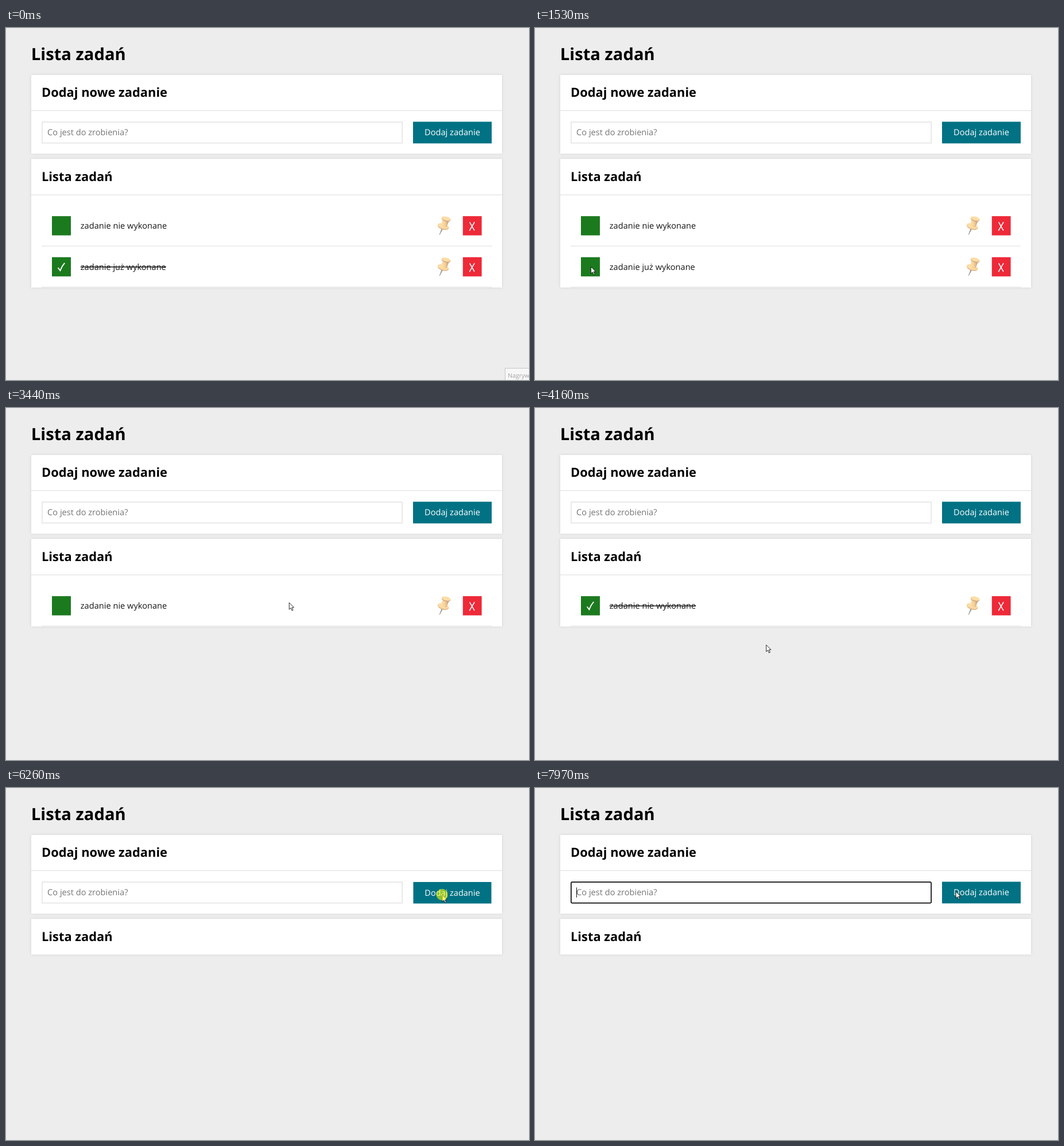
An HTML page for the animation above (8000 ms loop, 911 by 614 pixels).

```html
<!DOCTYPE html>
<html lang="pl">
<head>
<meta charset="utf-8">
<title>Lista zadań</title>
<style>
html, body { margin: 0; width: 100%; height: 100%; overflow: hidden; background: #ededed; }
svg { display: block; width: 911px; height: 614px; }
text { font: 14.6px "Open Sans", "Noto Sans", sans-serif; text-rendering: geometricPrecision; }
.h1 { font-size: 29.2px; font-weight: 700; }
.h2 { font-size: 21.9px; font-weight: 700; }
.panel { fill: #fff; filter: drop-shadow(0 0 2px #d2d2d2); }
.rule { fill: #ebebeb; }
.label { fill: #161616; }
.done .label { text-decoration: line-through; }
.tick { display: none; }
.done .tick { display: inline; }
.thin { fill: none; stroke: #fff; stroke-width: 1.6; }
#field { fill: #fff; stroke: #e6e6e6; stroke-width: 1.7; }
#field.focus { stroke: #0c0c0c; rx: 1.6px; }
</style>
</head>
<body>
<svg viewBox="0 0 911 614">
  <defs>
    <linearGradient id="brass">
      <stop offset="0" stop-color="#ffe3b0"/>
      <stop offset=".55" stop-color="#f6cf95"/>
      <stop offset="1" stop-color="#b9957a"/>
    </linearGradient>
    <g id="pin">
      <path d="M10.2 21.5 4.2 32.3 8 22Z" fill="#93908e" stroke="#93908e" stroke-width=".7"/>
      <ellipse cx="10.6" cy="18.4" rx="10" ry="5" transform="rotate(17 10.6 18.4)" fill="#dfb583"/>
      <ellipse cx="10.4" cy="17.3" rx="9.8" ry="4.4" transform="rotate(17 10.4 17.3)" fill="#fcdca4"/>
      <path d="M10 5 20.8 8 16.2 19.6Q10.5 20.3 6 16.4Z" fill="url(#brass)"/>
      <ellipse cx="15.6" cy="5.3" rx="8" ry="3.9" transform="rotate(13 15.6 5.3)" fill="#d2a982"/>
      <ellipse cx="15.6" cy="4.2" rx="7.9" ry="3.4" transform="rotate(13 15.6 4.2)" fill="#fddda6"/>
    </g>
  </defs>
  <rect width="911" height="614" fill="#ededed"/>
  <text class="h1" x="43.8" y="56">Lista zadań</text>

  <rect class="panel" x="44" y="82" width="820" height="137.3"/>
  <rect class="rule" x="44" y="143.2" width="820" height="1.8"/>
  <text class="h2" x="62" y="120.3">Dodaj nowe zadanie</text>
  <rect id="field" x="62.9" y="164.1" width="627.2" height="36.5"/>
  <text x="72.1" y="187.3" fill="#757575">Co jest do zrobienia?</text>
  <rect id="caret" x="72" y="173.5" width="1" height="17.5" fill="#111"/>
  <g id="button">
    <rect x="709" y="163.5" width="137" height="37.8" fill="#007284"/>
    <text x="777.5" y="187.3" fill="#fff" text-anchor="middle">Dodaj zadanie</text>
  </g>

  <rect class="panel" id="list" x="44" y="228.3" width="820"/>
  <rect class="rule" id="listRule" x="44" y="290.2" width="820" height="1.8"/>
  <text class="h2" x="62" y="267">Lista zadań</text>
  <g id="rows"></g>

  <g id="tip">
    <rect x="869.5" y="593.5" width="60" height="30" fill="#f7f7f7" stroke="#c4c4c4"/>
    <text x="874" y="609.5" fill="#a3a3a3" style="font-size:10.6px">Nagrywanie</text>
  </g>

  <path id="arrow" d="M.5 .5V12.3L3.3 9.7 5.3 14.3 7.2 13.4 5.2 9H8.8Z" fill="#fff" stroke="#111" stroke-width=".9"/>
  <path id="beam" d="M-3-7H-.8L0-6.4 .8-7H3M0-6.4V6.4M-3 7H-.8L0 6.4 .8 7H3" fill="none" stroke="#111"/>
  <circle id="click" r="10" fill="#ffff00" fill-opacity=".56"/>
</svg>
<script>
const LOOP = 8000, STEP = 57, HOLD = 70;
const $ = id => document.getElementById(id);
const show = (el, on) => { el.style.display = on ? "" : "none"; };

const addRow = (i, label) => {
  const g = document.createElementNS("http://www.w3.org/2000/svg", "g");
  g.setAttribute("transform", `translate(0 ${328.2 + i * 71.6})`);
  g.innerHTML = `
    <rect x="80" width="33" height="33.5" fill="#1b7a1e"/>
    <path class="tick thin" d="M90.6 18.3 94.4 23.3Q97.2 15.5 102.2 10" style="stroke-width:1.9"/>
    <text class="label" x="129.8" y="22">${label}</text>
    <use href="#pin" x="751"/>
    <rect x="795.8" width="32.8" height="33.5" fill="#ee2938"/>
    <path class="thin" d="M807.6 10.5 816 25.2M816.2 10.3 807.2 25.5"/>
    <rect class="rule" x="62" y="51.3" width="784" height="1.8"/>`;
  $("rows").append(g);
  return g;
};
const first = addRow(0, "zadanie nie wykonane");
const second = addRow(1, "zadanie już wykonane");

// pointer strokes, each from where the last one ended; sag bends the line
const home = { x: 908, y: 612 };
const strokes = [
  { from: 60, to: 840, x: 102, y: 427, sag: -75 },
  { from: 910, to: 1080, x: 97, y: 416, sag: 0 },
  { from: 2130, to: 2870, x: 808, y: 423, sag: 40 },
  { from: 3090, to: 3830, x: 97, y: 345, sag: -50 },
  { from: 4046, to: 4304, x: 836, y: 347, sag: 69 },
  { from: 4320, to: 4790, x: 811, y: 345, sag: 0 },
  { from: 4920, to: 5630, x: 762, y: 220, sag: 0 },
  { from: 5700, to: 6090, x: 759.5, y: 186, sag: 0 },
  { from: 6840, to: 7060, x: 616, y: 181, sag: 65 },
  { from: 7130, to: 7470, x: 602, y: 184, sag: 0 },
  { from: 7750, to: 7970, x: 732.5, y: 180, sag: 0 }
];
const clicks = [1460, 2070, 3030, 3990, 4860, 6260];
const [undo, redo, drop2, check1, drop1, add] = clicks.map(t => t + HOLD);

const smooth = u => u * u * (3 - 2 * u);

// the pointer advances in whole steps, as a screen recorder sees it
const pointer = t => {
  let { x, y } = home;
  for (const s of strokes) {
    if (t < s.from) break;
    const held = Math.floor((t - s.from + 3) / STEP) * STEP;
    const k = t >= s.to ? 1 : smooth(Math.min(1, held / (s.to - s.from)));
    x += (s.x - x) * k;
    y += (s.y - y) * k + s.sag * 4 * k * (1 - k);
  }
  return [x, y];
};

const draw = t => {
  show($("tip"), t < 60);
  show(first, t < drop1);
  show(second, t < drop2);
  first.classList.toggle("done", t >= check1);
  second.classList.toggle("done", t < undo || t >= redo);
  const rows = (t < drop1) + (t < drop2);
  $("list").setAttribute("height", rows ? 81.2 + rows * 71.6 : 62.2);
  show($("listRule"), rows);

  const focus = t >= add;
  $("field").classList.toggle("focus", focus);
  show($("caret"), focus && (t < 7440 || t >= 7940));
  const pressed = t >= add - HOLD && t < add;
  $("button").setAttribute("transform", pressed ? "translate(5.4 1.6) scale(.993)" : "");

  const [x, y] = pointer(t);
  const typing = x > 62 && x < 691 && y > 163 && y < 201;
  for (const id of ["arrow", "beam", "click"]) $(id).setAttribute("transform", `translate(${x} ${y})`);
  show($("arrow"), !typing && t >= 60);
  show($("beam"), typing);
  show($("click"), clicks.some(c => t >= c && t < c + HOLD));
};

const start = performance.now();
const tick = () => {
  draw((performance.now() - start) % LOOP);
  requestAnimationFrame(tick);
};
tick();
</script>
</body>
</html>
```
